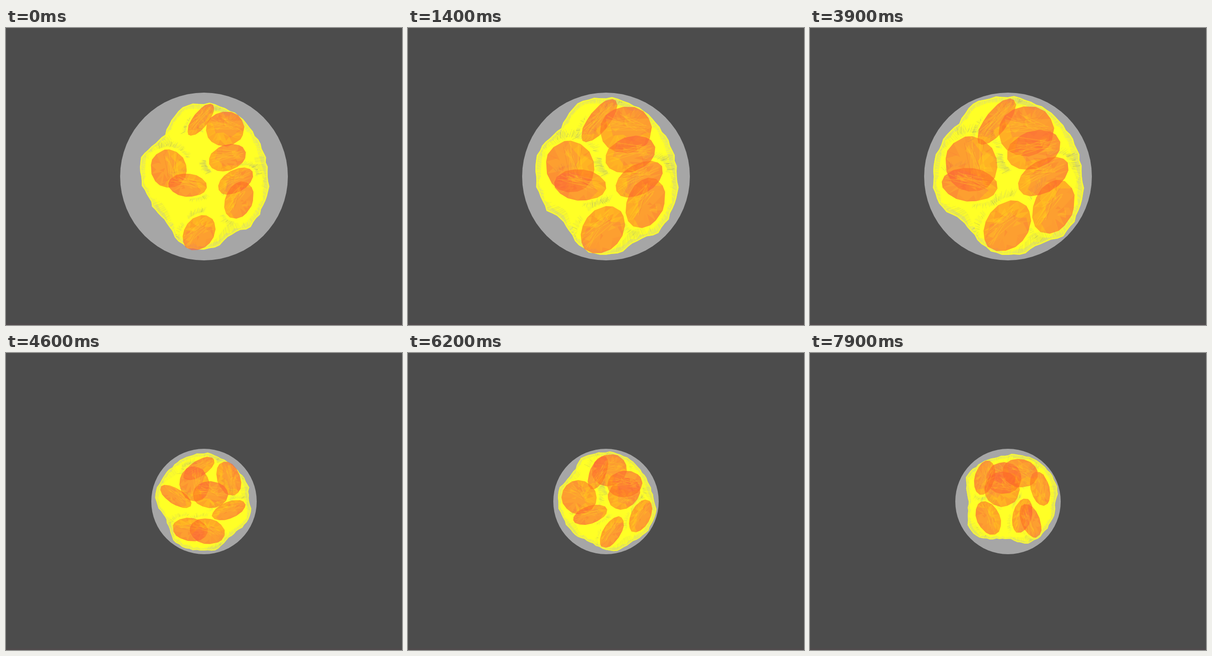
Recreate the animation shown at these times as an HTML page with a canvas. Size 864 px wide and 648 px high, loop 8 s.

```html
<!DOCTYPE html>
<html lang="en">
<head>
<meta charset="utf-8">
<title>Cell cluster</title>
<style>
html, body { margin: 0; width: 100%; height: 100%; overflow: hidden; background: #4c4c4c; }
canvas { display: block; }
</style>
</head>
<body>
<canvas id="stage" width="864" height="648"></canvas>
<script>
const ctx = document.getElementById('stage').getContext('2d');
const CX = 432, CY = 324, TAU = Math.PI * 2;
const LOOP = 8000, STEP = 100, CUT = 4300;
const NEAR = 183, FAR = 115;

// Close view: first and last x, y, then flatness and tilt in degrees.
const growing = [
  [425, 200, 407, 204, 0.40, -52], [478, 220, 472, 225, 0.90, -8],
  [483, 283, 488, 266, 0.67, -20], [501, 334, 509, 324, 0.57, -30],
  [508, 376, 531, 391, 0.71, -68], [421, 447, 430, 432, 0.76, -52],
  [355, 307, 352, 297, 0.93, 70], [396, 343, 348, 342, 0.60, 5]
];

// Distant view: x, y, flatness, tilt of each nucleus at three moments.
const turning = [
  [[421, 252, 0.45, -32], [440, 256, 0.9, -20], [423, 273, 0.9, 0]],
  [[486, 274, 0.65, 70], [471, 308, 0.8, -40], [419, 297, 1, 0]],
  [[411, 286, 0.84, 80], [475, 286, 0.75, -10], [502, 296, 0.53, 75]],
  [[446, 309, 0.75, 0], [371, 315, 0.95, 20], [381, 272, 0.55, -75]],
  [[370, 313, 0.44, 32], [416, 259, 0.46, -65], [458, 262, 0.8, 10]],
  [[486, 343, 0.47, -22], [508, 356, 0.55, -65], [463, 355, 0.54, -75]],
  [[402, 385, 0.66, 8], [446, 391, 0.49, -60], [481, 366, 0.53, 68]],
  [[439, 389, 0.72, 10], [396, 352, 0.49, -20], [389, 360, 0.65, 65]]
];
const TURN_FROM = 4600, TURN_TIME = 1650;

const mix = (a, b, u) => a + (b - a) * u;
const clamp = v => Math.max(0, Math.min(1, v));

function random(seed) {
  let s = seed * 7919 + 17;
  return () => {
    s = (s + 0x6D2B79F5) | 0;
    let v = Math.imul(s ^ (s >>> 15), 1 | s);
    v = (v + Math.imul(v ^ (v >>> 7), 61 | v)) ^ v;
    return ((v ^ (v >>> 14)) >>> 0) / 4294967296;
  };
}

function nucleus(x, y, size, flat, degrees) {
  const dx = x - CX, dy = y - CY;
  return {
    x, y, rx: size, ry: size * flat, tilt: degrees * Math.PI / 180,
    dist: Math.hypot(dx, dy), dir: Math.atan2(dy, dx)
  };
}

function grow(t) {
  const u = clamp(t / 3900), drift = u * (1.3 - 0.3 * u);
  const size = 42 + 19 * (1 - Math.exp(-t / 950));
  return growing.map(([x0, y0, x1, y1, flat, tilt]) =>
    nucleus(mix(x0, x1, drift), mix(y0, y1, drift), size, flat, tilt));
}

function turn(t) {
  const f = Math.max(0, Math.min(2, (t - TURN_FROM) / TURN_TIME));
  const i = Math.min(1, Math.floor(f)), u = f - i;
  return turning.map(path => {
    const a = path[i], b = path[i + 1];
    const swing = (b[3] - a[3] + 450) % 180 - 90;
    return nucleus(mix(a[0], b[0], u), mix(a[1], b[1], u), 38.5,
      mix(a[2], b[2], u), a[3] + swing * u);
  });
}

// The membrane bulges over nearby nuclei and dips where there are none.
function rimRadius(cells, shell, angle) {
  let weight = 0, reach = 0;
  for (const n of cells) {
    const w = Math.exp(8 * (Math.cos(angle - n.dir) - 1));
    weight += w;
    reach += w * n.dist;
  }
  const gap = Math.min(0.75, 1 - Math.min(1, weight));
  const base = 0.385 * shell + 0.92 * cells[0].rx;
  return Math.min(base + 0.43 * reach / weight - 0.23 * shell * gap, shell * 0.965);
}

const polar = (r, a) => [CX + r * Math.cos(a), CY + r * Math.sin(a)];

function ring(sides, radius) {
  return Array.from({ length: sides }, (_, i) => {
    const a = i / sides * TAU;
    return polar(radius(a), a);
  });
}

function trace(points) {
  ctx.beginPath();
  points.forEach(p => ctx.lineTo(p[0], p[1]));
  ctx.closePath();
}

function fillPath(points, color) {
  trace(points);
  ctx.fillStyle = color;
  ctx.fill();
}

function lines(list, color, width) {
  ctx.beginPath();
  for (const [x1, y1, x2, y2] of list) {
    ctx.moveTo(x1, y1);
    ctx.lineTo(x2, y2);
  }
  ctx.strokeStyle = color;
  ctx.lineWidth = width;
  ctx.stroke();
}

// Point inside a nucleus, in units of its radii.
function place(n, r, a) {
  const x = n.rx * r * Math.cos(a), y = n.ry * r * Math.sin(a);
  const c = Math.cos(n.tilt), s = Math.sin(n.tilt);
  return [n.x + x * c - y * s, n.y + x * s + y * c];
}

// Fine mesh folds: fans beside the nuclei and ridges along the rim.
function drawFolds(cells, rim, scale) {
  const pale = [], dark = [], bright = [], rnd = random(41);
  for (const n of cells) {
    for (let fan = 0; fan < 2; fan++) {
      const start = rnd() * TAU;
      for (let i = 0; i < 30; i++) {
        const a = start + i * 0.028 + rnd() * 0.02, r = 1.12 + rnd() * 0.08;
        const line = [...place(n, r, a), ...place(n, r + 0.1 + rnd() * 0.25, a + 0.06)];
        (rnd() < 0.15 ? dark : pale).push(line);
      }
    }
  }
  const count = 420;
  for (let i = 0; i < count; i++) {
    const a = (i + rnd()) / count * TAU, r = rim(a);
    const inner = 0.87 + 0.04 * Math.sin(a * 9 + 1);
    const line = [...polar(r * inner, a), ...polar(r * (0.94 + rnd() * 0.05), a + 0.025)];
    (Math.sin(a * 5 + 2) + rnd() > 0.8 ? pale : bright).push(line);
  }
  lines(pale, 'rgba(195,195,110,0.45)', 0.75 * scale);
  lines(dark, 'rgba(125,130,125,0.5)', 0.7 * scale);
  lines(bright, 'rgba(255,255,38,0.8)', 1.3 * scale);
}

function drawNucleus(n, index, scale) {
  const rnd = random(index + 90), sides = 16;
  const edge = Array.from({ length: sides }, (_, i) =>
    place(n, 0.99 + rnd() * 0.04, (i + rnd() * 0.35) / sides * TAU));
  fillPath(edge, 'rgba(255,110,34,0.52)');

  ctx.save();
  trace(edge);
  ctx.clip();
  // The side turned to the shell sits under a thinner membrane.
  const outer = edge.map((p, i) => {
    const push = (0.55 + 0.25 * (i % 2)) * n.ry;
    return [p[0] + Math.cos(n.dir) * push, p[1] + Math.sin(n.dir) * push];
  });
  fillPath(outer, 'rgba(245,100,85,0.26)');

  for (let i = 0; i < sides; i++) {
    const tip = place(n, 0.4 + rnd() * 0.38, (i + rnd() * 1.5) / sides * TAU);
    fillPath([edge[i], edge[(i + 1) % sides], tip], `rgba(245,85,65,${0.02 + 0.18 * rnd()})`);
  }
  for (let i = 0; i < 8; i++) {
    const a = rnd() * TAU, r = 0.2 + rnd() * 0.55;
    const facet = [place(n, r, a), place(n, r + 0.18, a + 0.35), place(n, r * 0.6, a + 0.7)];
    fillPath(facet, i % 3 ? 'rgba(255,225,25,0.2)' : 'rgba(245,75,55,0.16)');
  }
  // Folds of the membrane in front, crossing as a loose band.
  const folds = [];
  for (let i = 0; i < 14; i++) {
    const a = Math.PI + rnd() * 1.4, b = rnd() * 1.2 - 0.8;
    folds.push([...place(n, 0.4 + rnd() * 0.6, a), ...place(n, 0.3 + rnd() * 0.6, b)]);
  }
  lines(folds.slice(0, 11), 'rgba(255,225,30,0.26)', 1.6 * scale);
  lines(folds.slice(11), 'rgba(230,80,60,0.25)', 0.9 * scale);
  ctx.restore();
}

function draw(t) {
  const close = t < CUT;
  const shell = close ? NEAR : FAR, scale = shell / NEAR;
  const cells = close ? grow(t) : turn(t);
  const rim = a => rimRadius(cells, shell, a);
  const rough = random(5);

  ctx.fillStyle = '#4c4c4c';
  ctx.fillRect(0, 0, 864, 648);
  ctx.fillStyle = '#504a4c';
  ctx.fillRect(0, 645, 864, 3);
  fillPath(ring(64, () => shell), '#a6a6a6');

  const edge = ring(84, a => rim(a) + (rough() - 0.5) * 5 * scale);
  fillPath(edge, '#e9e954');
  ctx.save();
  ctx.clip();
  fillPath(ring(84, a => rim(a) * 0.94 + (rough() - 0.5) * 9 * scale), '#ffff26');
  drawFolds(cells, rim, scale);
  trace(edge);
  ctx.strokeStyle = 'rgba(255,255,38,0.8)';
  ctx.lineWidth = 5 * scale;
  ctx.stroke();
  ctx.restore();

  cells.forEach((n, i) => drawNucleus(n, i, scale));
}

function tick() {
  const t = performance.now() % LOOP;
  draw(Math.floor(t / STEP) * STEP);
  requestAnimationFrame(tick);
}
tick();
</script>
</body>
</html>
```
